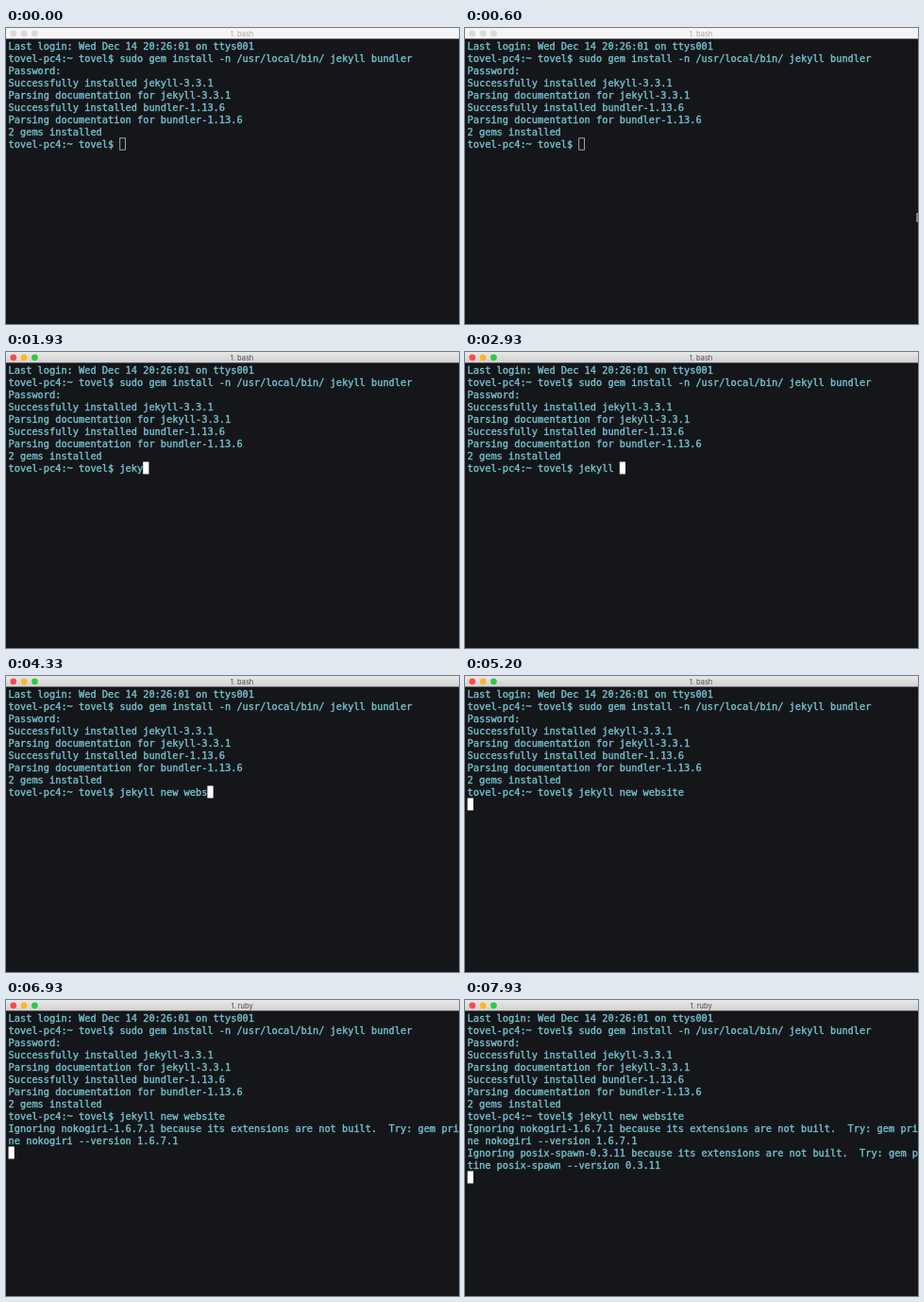
Animation of 480 by 314 pixels, one loop 8000 ms. Source, as an HTML page with a canvas:

```html
<!DOCTYPE html>
<html lang="en">
<head>
<meta charset="utf-8">
<title>Terminal session</title>
<style>
  html, body { margin: 0; width: 100%; height: 100%; overflow: hidden; background: #15161a; }
  canvas { display: block; width: 480px; height: 314px; }
</style>
</head>
<body>
<canvas id="stage" width="480" height="314"></canvas>
<script>
const ctx = document.getElementById('stage').getContext('2d');
const LOOP = 8000;
const CELL_W = 6.2, ROW_H = 13, LEFT = 2.6, TOP = 12.5, ASCENT = 10.4;
const COLS = 80, BAR_H = 11.4;
const TEXT = '#72bfcc', BACK = '#15161a';

const PROMPT = 'tovel-pc4:~ tovel$ ';
const COMMAND = 'jekyll new website';
const KEY_TIMES = [1470, 1600, 1730, 1870, 2070, 2200, 2400, 3070, 3200,
                   3330, 3470, 3930, 4070, 4200, 4300, 4470, 4570, 4670];
const FOCUS_AT = 1070, ENTER_AT = 5000, RUBY_AT = 6600;

const HISTORY = [
  'Last login: Wed Dec 14 20:26:01 on ttys001',
  PROMPT + 'sudo gem install -n /usr/local/bin/ jekyll bundler',
  'Password:',
  'Successfully installed jekyll-3.3.1',
  'Parsing documentation for jekyll-3.3.1',
  'Successfully installed bundler-1.13.6',
  'Parsing documentation for bundler-1.13.6',
  '2 gems installed'
];

const warning = (gem, version) =>
  `Ignoring ${gem}-${version} because its extensions are not built.  ` +
  `Try: gem pristine ${gem} --version ${version}`;

const OUTPUT = [
  { at: 6800, text: warning('nokogiri', '1.6.7.1') },
  { at: 7000, text: warning('posix-spawn', '0.3.11') }
];

const colX = col => LEFT + col * CELL_W;
const rowY = row => TOP + row * ROW_H;

function wrap(text) {
  const rows = [];
  for (let i = 0; i < text.length; i += COLS) rows.push(text.slice(i, i + COLS));
  return rows;
}

function screenAt(t) {
  const typed = KEY_TIMES.filter(at => at <= t).length;
  const rows = [...HISTORY, PROMPT + COMMAND.slice(0, typed)];
  for (const { at, text } of OUTPUT) if (t >= at) rows.push(...wrap(text));
  const cursor = t < ENTER_AT
    ? { row: rows.length - 1, col: PROMPT.length + typed }
    : { row: rows.length, col: 0 };
  return { rows, cursor };
}

// Draws at double size, scaled down, for fractional glyph placement.
function drawRow(text, row) {
  ctx.save();
  ctx.scale(0.5, 0.5);
  ctx.font = '20.6px "DejaVu Sans Mono", monospace';
  ctx.textAlign = 'left';
  ctx.fillStyle = ctx.strokeStyle = TEXT;
  ctx.lineWidth = 0.8;
  ctx.lineJoin = 'round';
  const y = (rowY(row) + ASCENT) * 2;
  [...text].forEach((char, col) => {
    if (char === ' ') return;
    ctx.fillText(char, colX(col) * 2, y);
    ctx.strokeText(char, colX(col) * 2, y);
  });
  ctx.restore();
}

function drawCursor({ row, col }, focused) {
  const x = colX(col), y = rowY(row);
  if (focused) {
    ctx.fillStyle = '#fff';
    ctx.fillRect(x, y, CELL_W, ROW_H);
  } else {
    ctx.strokeStyle = '#b4b4b4';
    ctx.lineWidth = 0.9;
    ctx.strokeRect(x + 0.3, y + 0.3, CELL_W - 0.4, ROW_H - 0.6);
  }
}

function drawTitleBar(focused, title) {
  if (focused) {
    const shade = ctx.createLinearGradient(0, 0, 0, BAR_H);
    shade.addColorStop(0, '#e9e8e9');
    shade.addColorStop(1, '#d2d1d2');
    ctx.fillStyle = shade;
  } else {
    ctx.fillStyle = '#f5f5f5';
  }
  ctx.fillRect(0, 0, 480, BAR_H);

  const lights = focused ? ['#fb4a49', '#fdb626', '#2bcb42'] : Array(3).fill('#dadada');
  lights.forEach((color, i) => {
    ctx.fillStyle = color;
    ctx.beginPath();
    ctx.arc(7.8 + i * 11.3, 5.8, 3.4, 0, Math.PI * 2);
    ctx.fill();
  });

  ctx.save();
  ctx.scale(0.5, 0.5);
  ctx.font = '15px Inter, Roboto, sans-serif';
  ctx.textAlign = 'center';
  ctx.fillStyle = focused ? '#484848' : '#a8a8a8';
  ctx.fillText(title, 500, 17);
  ctx.restore();
}

function drawPointer(t) {
  if (t < 530 || t >= 800) return;
  const x = 480 + Math.abs(t - 630) / 60;
  const y = 201 + Math.max(0, 600 - t) * 0.3;
  ctx.strokeStyle = '#e8e8e8';
  ctx.lineWidth = 1;
  ctx.strokeRect(x - 1.5, y - 4, 3, 8);
}

function render(t) {
  const focused = t >= FOCUS_AT;
  const { rows, cursor } = screenAt(t);
  ctx.fillStyle = BACK;
  ctx.fillRect(0, 0, 480, 314);
  drawTitleBar(focused, t < RUBY_AT ? '1. bash' : '1. ruby');
  rows.forEach(drawRow);
  drawCursor(cursor, focused);
  drawPointer(t);
}

const start = performance.now();
function tick() {
  render((performance.now() - start) % LOOP);
  requestAnimationFrame(tick);
}
tick();
</script>
</body>
</html>
```
